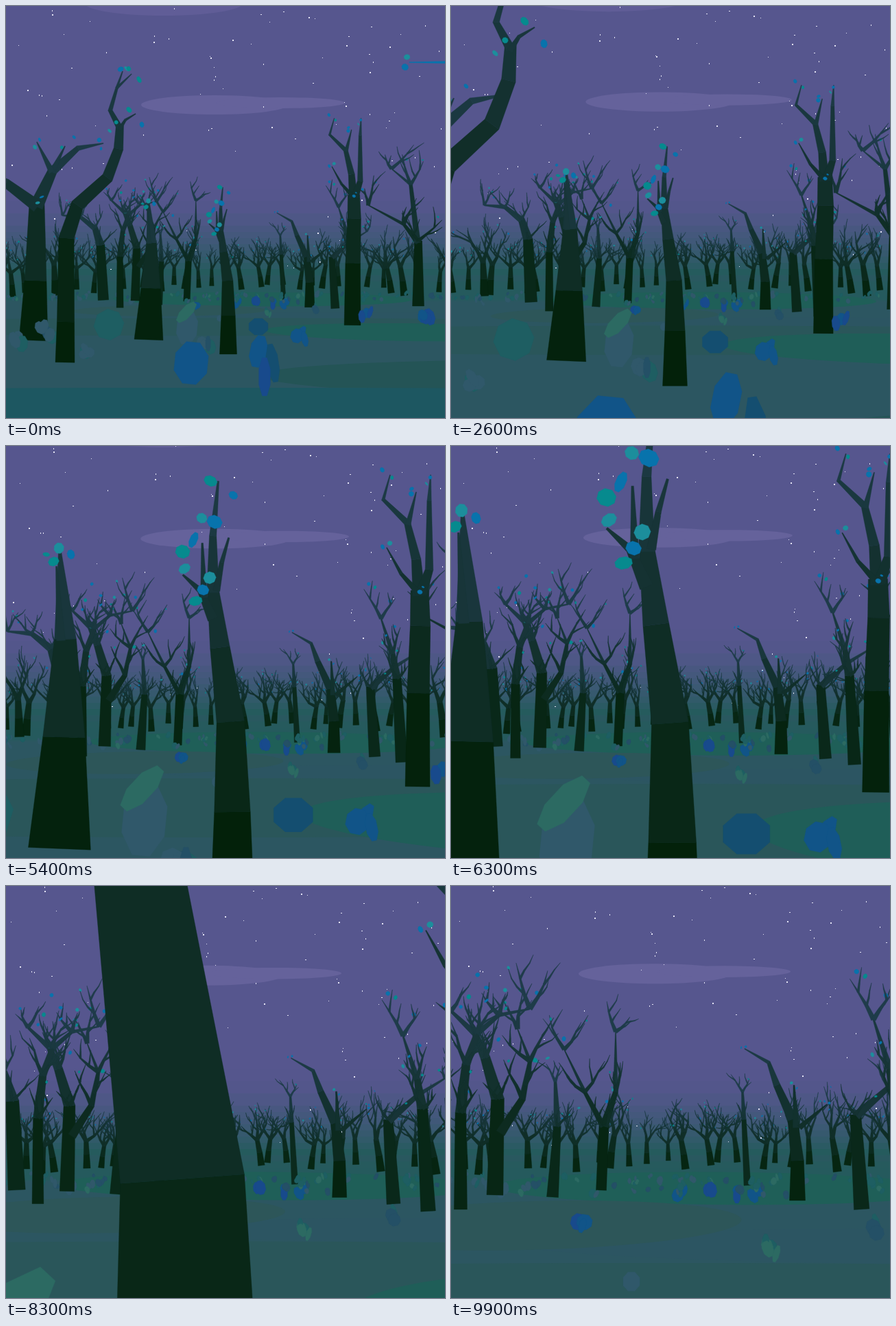
Recreate the animation shown at these times as an HTML page with a canvas. Size 640 by 600 pixels, loop 10000 ms.

```html
<!DOCTYPE html>
<html lang="en">
<head>
<meta charset="utf-8">
<title>Night forest</title>
<style>
html, body { margin: 0; width: 100%; height: 100%; overflow: hidden; background: #55558c; }
canvas { display: block; width: 100vw; height: 100vh; }
</style>
</head>
<body>
<canvas id="stage" width="640" height="600"></canvas>
<script>
const ctx = document.getElementById('stage').getContext('2d');
const CX = 320, HORIZON = 397, GROUND = 850, NEAR = 0.3, UP = -Math.PI / 2, TAU = Math.PI * 2;

let seed = 11;
const rnd = (a = 0, b = 1) => {
  seed = (seed * 1664525 + 1013904223) % 4294967296;
  return a + (b - a) * seed / 4294967296;
};
const pick = list => list[Math.floor(rnd(0, list.length))];
const mix = (a, b, k) => a.map((v, i) => v + (b[i] - v) * k);
const rgb = c => `rgb(${c.map(Math.round)})`;

// Camera: forward travel, turning, tilting and a late sidestep
const TURN = [[0, 0], [3.8, 1], [5.4, 2], [8.3, -11], [9.9, -6]];
const travel = t => 1.05 * t - 0.01 * t * t;
const side = t => -20 * Math.max(0, t - 5);
const tilt = t => -0.6 * t;
function turn(t) {
  let i = 0;
  while (i < TURN.length - 2 && t > TURN[i + 1][0]) i++;
  const [t0, a] = TURN[i], [t1, b] = TURN[i + 1];
  return a + (b - a) * (1 - Math.cos(Math.PI * (t - t0) / (t1 - t0))) / 2;
}
function unproject(x, y, z, t) {
  const depth = z - travel(t);
  return [(x - CX - turn(t)) * depth - side(t), (y - HORIZON - tilt(t)) * depth];
}

// Every thing is a set of flat polygons standing at one depth
const things = [];
function add(z, t, polys) {
  things.push({ z, polys: polys.map(p => ({ color: rgb(p.color), pts: p.pts.map(([x, y]) => unproject(x, y, z, t)) })) });
}
function blob(x, y, rx, ry, rot, color) {
  const c = Math.cos(rot), s = Math.sin(rot), pts = [];
  for (let a = TAU / 16; a < TAU; a += TAU / 8) {
    const u = rx * Math.cos(a), v = ry * Math.sin(a);
    pts.push([x + u * c - v * s, y + u * s + v * c]);
  }
  return { color, pts };
}
function limb(out, pts, w0, w1) {
  const n = pts.length - 1;
  const edge = pts.map(([x, y], i) => {
    const p = pts[Math.max(0, i - 1)], q = pts[Math.min(n, i + 1)];
    const dx = q[0] - p[0], dy = q[1] - p[1], h = (w0 + (w1 - w0) * i / n) / 2 / (Math.hypot(dx, dy) || 1);
    return [[x - dy * h, y + dx * h], [x + dy * h, y - dx * h]];
  });
  for (let i = 0; i < n; i++)
    out.push({ pts: [edge[i][0], edge[i + 1][0], edge[i + 1][1], edge[i][1]], mid: (pts[i][1] + pts[i + 1][1]) / 2 });
}
const BARK = [2, 32, 8], TWIG = [31, 60, 74], MIST = [30, 66, 74];
function shade(polys, z, base, top) {
  for (const p of polys) if (!p.color) {
    const k = Math.min(1, Math.max(0, (base - p.mid) / (base - top) * 1.12 - .17));
    p.color = mix(mix(BARK, TWIG, k), MIST, Math.min(.25, z / 250));
  }
}
const LEAVES = [[28, 142, 156], [8, 115, 172], [6, 138, 142]];
function leaf(out, x, y, depth, spread) {
  out.push(blob(x + rnd(-spread, spread), y + rnd(-spread, spread), rnd(12, 40) / depth, rnd(22, 42) / depth, rnd(0, 3), pick(LEAVES)));
}
// A branch that curves upwards and splits into finer ones
function grow(out, x, y, a, len, w, level, depth) {
  const pts = [[x, y]];
  for (let i = 0; i < 3; i++) {
    a += (UP - a) * rnd(0, .35) + rnd(-.2, .2);
    x += Math.cos(a) * len / 3;
    y += Math.sin(a) * len / 3;
    pts.push([x, y]);
  }
  limb(out, pts, w, .2);
  if (rnd() < .25) leaf(out, x, y, depth, 120 / depth);
  if (level) for (const [px, py] of pts.slice(1, 3))
    grow(out, px, py, a + pick([-1, 1]) * rnd(.4, .9), len * rnd(.45, .75), w * .5, level - 1, depth);
}

// Limbs are [start width, end width, x, y, x, y, ...] as seen at time t; twigs sprout along them by rule
function tree(z, t, twigs, ...limbs) {
  const polys = [], depth = z - travel(t);
  const paths = limbs.map(([w0, w1, ...c]) => {
    const pts = [];
    for (let i = 0; i < c.length; i += 2) pts.push([c[i], c[i + 1]]);
    limb(polys, pts, w0, w1);
    return pts;
  });
  const base = limbs[0][3], top = Math.min(...paths.flat().map(p => p[1])), tall = base - top;
  for (const pts of paths) {
    const [x, y] = pts[pts.length - 1];
    if (!twigs) {
      leaf(polys, x, y, depth, 80 / depth);
      leaf(polys, x, y, depth, 140 / depth);
    } else for (const [px, py] of pts.slice(1)) if (base - py > tall * .4)
      for (const way of [-1, 1]) grow(polys, px, py, UP + way * rnd(.2, 1), tall * rnd(.1, .24), tall * .025, 1, depth);
  }
  shade(polys, z, base, top);
  add(z, t, polys);
}
function wildTree(x, y, z, h) {
  const polys = [], w = h * .1 + 1, lean = rnd(-.08, .08) * h, cx = x + lean;
  limb(polys, [[x, y], [x + lean * .4, y - h * .22], [cx, y - h * .45]], w, w * .6);
  const n = pick([2, 3]);
  for (let i = 0; i < n; i++)
    grow(polys, cx, y - h * .43, UP + (i - (n - 1) / 2) * .9 + rnd(-.2, .2), h * rnd(.35, .55), w * .5, 2, z);
  shade(polys, z, y, y - h);
  add(z, 0, polys);
}

// Near trees
tree(7.8, 0, false,
  [28, 11, 86, 519, 87, 460, 88, 338, 104, 290, 148, 250, 164, 208, 166, 174],
  [9, 1, 166, 178, 152, 152, 162, 118, 170, 95], [4, 1, 161, 120, 183, 99], [6, 1, 165, 180, 174, 166, 189, 157]);
tree(10.2, 0, false,
  [42, 22, 40, 487, 43, 400, 45, 288], [20, 1, 44, 292, 68, 240, 105, 207, 142, 200],
  [9, 1, 67, 242, 86, 204], [9, 1, 67, 242, 45, 198], [18, 8, 46, 292, 0, 258, -22, 246]);
tree(10, 0, false, [42, 1, 208, 486, 211, 411, 212, 345, 208, 282], [6, 1, 209, 346, 206, 296]);
tree(8.79, 0, false,
  [25, 6.5, 324, 507, 324, 451, 323, 400, 317, 358, 313, 325], [7, 1, 313, 327, 313, 295, 316, 264],
  [6, 1, 313, 342, 306, 326, 296, 317], [4, 1, 308, 330, 307, 299], [4, 1, 315, 326, 318, 310, 322, 296]);
tree(7.7, 0, false, [5, 1, 660, 82, 640, 82, 588, 82]);
tree(16, 5.4, false,
  [36, 26, 600, 496, 601, 360, 604, 262, 603, 210], [18, 1, 602, 218, 598, 165, 585, 112, 550, 78, 560, 42],
  [8, 1, 586, 115, 598, 67], [17, 1, 605, 215, 617, 180, 617, 80, 619, 42], [9, 1, 602, 215, 576, 186, 555, 148]);

// Middle trees
tree(19.8, 0, true, [17, 11, 601, 437, 601, 342], [8, 1, 601, 345, 580, 318, 528, 290], [9, 1, 600, 345, 590, 260, 562, 237]);
tree(21, 3.8, true, [19, 2, 103, 433, 98, 335, 88, 305, 62, 285, 30, 282]);
tree(20, 9.9, true, [19, 2, 14, 471, 14, 330, 22, 260, 38, 215, 70, 188, 115, 179]);
tree(20.7, 9.9, true, [24, 4, 64, 450, 68, 310, 50, 250, 35, 215, 0, 182], [14, 1, 72, 360, 104, 310, 115, 255, 97, 208]);
tree(24.2, 9.9, true, [17, 4, 148, 453, 155, 350, 152, 285]);
tree(25.8, 9.9, true, [15, 14, 219, 443, 223, 348], [9, 1, 222, 350, 195, 300, 165, 238], [13, 1, 223, 350, 240, 300, 240, 212]);
tree(24.9, 9.9, false, [23, 1, 505, 458, 505, 400, 498, 340, 475, 290, 463, 257, 428, 237], [9, 2, 503, 352, 500, 290], [8, 1, 508, 352, 548, 318]);
tree(20.7, 8.3, true, [20, 14, 565, 463, 557, 340], [11, 2, 558, 342, 600, 305, 640, 280]);
tree(20, 7.2, true, [20, 2, 598, 468, 590, 330, 583, 290, 564, 232]);
tree(30.4, 9.9, true, [10, 3, 432, 436, 427, 340, 425, 300]);

// Distant trees stand further away towards the middle
for (let x = -335; x < 345; x += 20) {
  const z = rnd(24, 36) + 14 * (1 - Math.abs(x) / 335);
  wildTree(CX + x + rnd(-9, 9), HORIZON - 22 + 1400 / z, z, rnd(2100, 3100) / z);
}

// Undergrowth: a plant is a few ovals around one spot
const NAVY = [17, 84, 136], INK = [24, 74, 140], DEEP = [20, 78, 112], SLATE = [48, 88, 106],
  MOSS = [44, 106, 98], FERN = [30, 94, 98], DUSK = [36, 80, 102];
function plant(z, t, x, y, size, count, colors) {
  const ovals = [];
  for (let i = 0; i < count; i++) {
    const off = i ? size * .8 : 0;
    ovals.push(blob(x + rnd(-off, off), y + rnd(-off, off), size * rnd(.3, .75), size * rnd(.6, 1), rnd(-.6, .6), pick(colors)));
  }
  add(z, t, ovals);
}
const oval = (z, t, color, ...shape) => add(z, t, [blob(...shape, color)]);
oval(5.7, 0, NAVY, 270, 520, 26, 33, .1);
oval(10.2, 0, SLATE, 264, 468, 16, 27, .1);
oval(10.1, 0, MOSS, 263, 446, 8, 20, .75);
oval(10.5, 0, DEEP, 368, 467, 15, 13, 0);
oval(6.6, 0, NAVY, 368, 503, 13, 25, .2);
oval(5.7, 0, INK, 377, 540, 9, 30, 0);
oval(5.9, 0, DEEP, 389, 520, 9, 30, -.15);
oval(10.3, 0, FERN, 150, 464, 22, 23, .3);
oval(13.7, 9.9, SLATE, 263, 576, 13, 15, 0);
plant(9.6, 0, 290, 490, 12, 6, [FERN, DUSK, SLATE]);
plant(11.8, 0, 430, 476, 14, 3, [INK, NAVY]);
plant(15.4, 0, 525, 447, 11, 3, [INK, NAVY]);
plant(15, 0, 608, 453, 13, 4, [INK, NAVY]);
plant(9, 0, 60, 476, 13, 5, [FERN, SLATE, DUSK]);
plant(9, 0, 115, 505, 11, 4, [FERN, SLATE]);
plant(9, 0, 18, 482, 13, 3, [FERN, SLATE]);
plant(15.6, 9.9, 185, 489, 18, 3, [NAVY, INK]);
plant(14.8, 9.9, 465, 525, 15, 6, [FERN, FERN, MOSS]);
plant(16, 9.9, 620, 492, 17, 3, [FERN, DUSK]);
for (const x of [340, 374, 418, 448]) plant(25.8, 9.9, x, 443, 12, 2, [INK, NAVY]);
for (let i = 0; i < 110; i++) {
  const z = rnd(21.5, 31);
  plant(z, 0, CX + rnd(-330, 390), HORIZON + rnd(600, 760) / z, rnd(60, 130) / z, 2, pick([[FERN], [SLATE], [MOSS, FERN], [DUSK], [FERN, SLATE]]));
}
things.sort((a, b) => b.z - a.z);

// Ground patches: colour, centre x, centre depth, radius x, radius depth
const PATCHES = [
  ['#1f5f58', 1500, 32, 6500, 11], ['#2c5562', 3000, 16, 4300, 1.3], ['#2d5659', -1500, 18.8, 2600, 3.3],
  ['#2a565a', 0, 12.5, 9000, 2.3], ['#1f5e58', 3000, 11.2, 2350, 1.9], ['#245456', 3500, 6, 3200, 1.2], ['#1d5761', 0, 0, 20000, 5.35]
];
const SKY = [86, 86, 142], FAR = [36, 91, 92], EARTH = [44, 86, 97];
const bands = [[0, SKY]];
for (let y = 266; y < 430; y += y < 320 ? 18 : 9) {
  const k = Math.min(1, ((y - 256) / 129) ** 1.8);
  bands.push([y, k < 1 ? mix(SKY, FAR, k) : mix(FAR, EARTH, rnd())]);
}
bands.push([430, EARTH]);

const stars = [];
for (let i = 0; i < 90; i++) stars.push([rnd(0, 640), 385 * rnd() ** 1.4, pick([1, 1, 2]), pick([1, 2])]);

function fillPoly(pts, color) {
  ctx.beginPath();
  for (const [x, y] of pts) ctx.lineTo(x, y);
  ctx.closePath();
  ctx.fillStyle = color;
  ctx.fill();
}
function cloud(x, y, rx, ry, t, color) {
  const k = 240 / (240 - travel(t));
  ctx.beginPath();
  ctx.ellipse(CX + turn(t) + (x - CX) * k, HORIZON + tilt(t) + (y - HORIZON) * k, rx * k, ry * k, 0, 0, TAU);
  ctx.fillStyle = color;
  ctx.fill();
}
function drawGround(t) {
  for (const [color, px, pz, rx, rz] of PATCHES) {
    if (pz + rz - travel(t) < 3) continue;
    const pts = [];
    for (let a = 0; a < TAU; a += TAU / 120) {
      const z = Math.max(.8, pz + rz * Math.sin(a) - travel(t));
      pts.push([CX + turn(t) + (px + rx * Math.cos(a) + side(t)) / z, HORIZON + tilt(t) + GROUND / z]);
    }
    fillPoly(pts, color);
  }
}
function draw(t) {
  const ox = CX + turn(t), oy = HORIZON + tilt(t), shift = side(t);
  for (const [y, color] of bands) {
    ctx.fillStyle = rgb(color);
    ctx.fillRect(0, y, 640, 600 - y);
  }
  cloud(230, -4, 115, 18, t, '#605d97');
  cloud(304, 144, 107, 14, t, '#65629b');
  cloud(400, 141, 94, 8, t, '#65629b');
  ctx.fillStyle = '#e4e4f4';
  for (const [x, y, w, h] of stars) ctx.fillRect(Math.round(x + turn(t)), Math.round(y + tilt(t)), w, h);
  drawGround(t);
  ctx.lineWidth = .4;
  for (const { z, polys } of things) {
    const depth = z - travel(t);
    if (depth < NEAR) continue;
    for (const { color, pts } of polys) {
      fillPoly(pts.map(([x, y]) => [ox + (x + shift) / depth, oy + y / depth]), color);
      ctx.strokeStyle = color;
      ctx.stroke();
    }
  }
}

let shown = -1;
function frame() {
  const step = Math.floor(performance.now() % 10000 / 100);
  if (step !== shown) draw((shown = step) / 10);
  requestAnimationFrame(frame);
}
frame();
</script>
</body>
</html>
```
